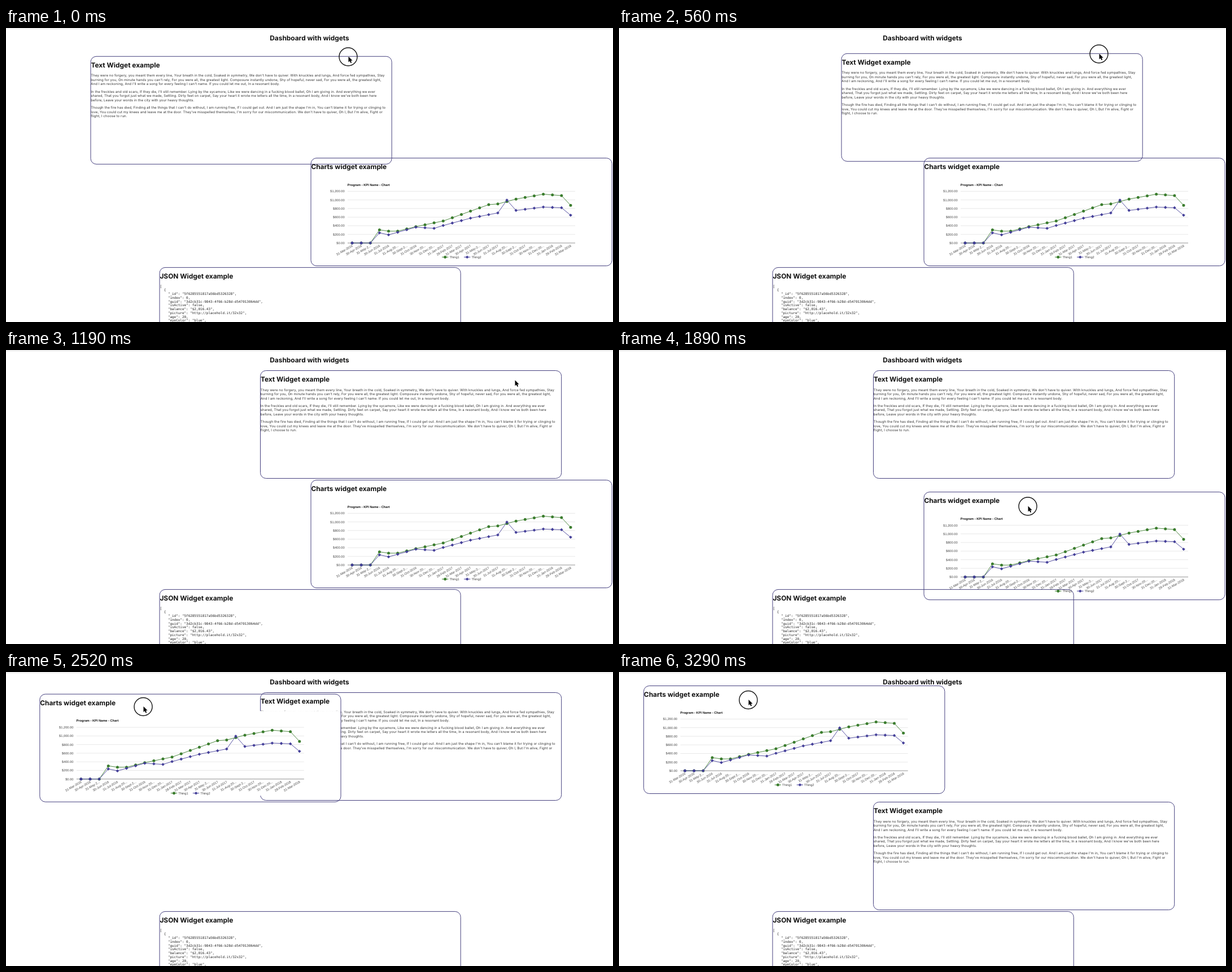
These frames come from a looping animation (1075x521 px, 3360 ms). An HTML page:

```html
<!DOCTYPE html>
<html lang="en">
<head>
<meta charset="utf-8">
<title>Dashboard with widgets</title>
<style>
  html, body { margin: 0; width: 100%; height: 100%; overflow: hidden; background: #fff; }
  svg { display: block; width: 1075px; height: 521px; }
  text { white-space: pre; text-rendering: geometricPrecision; }
  .heading { font: 700 11.9px Inter, sans-serif; fill: #111; }
  .body { font: 6px Inter, sans-serif; letter-spacing: .1px; fill: #333; }
  .code { font: 5.94px "DejaVu Sans Mono", monospace; fill: #222; }
  .label { font: 5.7px "Liberation Sans", Arial, sans-serif; fill: #444; }
  .strong { font-weight: 700; fill: #111; }
  .end { text-anchor: end; }
  .middle { text-anchor: middle; }
  .frame { fill: none; stroke: #46417f; }
</style>
</head>
<body>
<svg id="stage" viewBox="0 0 1075 521"></svg>
<script>
const LOOP = 3360;
const GREEN = '#3b7d2e', PURPLE = '#443f99';
const stage = document.getElementById('stage');

function add(parent, tag, attrs = {}, content = '') {
  const node = document.createElementNS('http://www.w3.org/2000/svg', tag);
  for (const key in attrs) node.setAttribute(key, attrs[key]);
  node.textContent = content;
  return parent.appendChild(node);
}
const write = (parent, cls, x, y, content, extra = {}) =>
  add(parent, 'text', { class: cls, x, y, ...extra }, content);
const place = (node, x, y) => node.setAttribute('transform', `translate(${x} ${y})`);

function widget(title) {
  const group = add(stage, 'g');
  add(group, 'rect', { class: 'frame', width: 533.2, height: 191, rx: 10 });
  write(group, 'heading', .4, 19.7, title);
  return group;
}

const paragraphs = [
  ["They were no forgery, you meant them every line, Your breath in the cold, Soaked in symmetry, We don't have to quiver. With knuckles and lungs, And force fed sympathies, Stay",
   "burning for you, On minute hands you can't rely, For you were all, the greatest light. Composure instantly undone, Shy of hopeful, never sad, For you were all, the greatest light,",
   "And I am reckoning, And I'll write a song for every feeling I can't name. If you could let me out, In a resonant body."],
  ["In the freckles and old scars, If they die, I'll still remember. Lying by the sycamore, Like we were dancing in a fucking blood ballet, Oh I am giving in. And everything we ever",
   "shared, That you forgot just what we made, Settling. Dirty feet on carpet, Say your heart it wrote me letters all the time, In a resonant body, And I know we've both been here",
   "before, Leave your words in the city with your heavy thoughts."],
  ["Though the fire has died, Finding all the things that I can't do without, I am running free, If I could get out. And I am just the shape I'm in, You can't blame it for trying or clinging to",
   "love, You could cut my knees and leave me at the door. They've misspelled themselves, I'm sorry for our miscommunication. We don't have to quiver, Oh I, But I'm alive, Fight or",
   "flight, I choose to run."]
];

const json = `[
  {
    "_id": "5f6285551817a56bd5326328",
    "index": 0,
    "guid": "3d2cb31c-9843-4f66-b28d-d547013064dd",
    "isActive": false,
    "balance": "$2,016.43",
    "picture": "http://placehold.it/32x32",
    "age": 20,
    "eyeColor": "blue",`;

const MONTHS = 25, AXIS = 150.5, STEP = 16.12;
const names = 'Jan Feb Mar Apr May Jun Jul Aug Sept Oct Nov Dec'.split(' ');

// Corners of each line as month and height; the months between lie on straight lines
const thing1 = [[0, 0], [2, 0], [3, 23.3], [4, 21], [5, 21], [7, 29], [10, 39],
  [15, 68], [16, 69.2], [18, 77.8], [21, 86.5], [23, 84], [24, 66.8]];
const thing2 = [[0, 0], [2, 0], [3, 18], [4, 14.5], [7, 28], [9, 26], [10, 31],
  [13, 44], [16, 53.3], [17, 76], [18, 57.7], [21, 63.7], [23, 62.5], [24, 49.2]];

function heightAt(corners, month) {
  const next = Math.max(1, corners.findIndex(([m]) => m >= month));
  const [[m0, h0], [m1, h1]] = corners.slice(next - 1, next + 1);
  return h0 + (h1 - h0) * (month - m0) / (m1 - m0);
}

function monthLabel(i) {
  const month = (i + 2) % 12, year = 2016 + Math.floor((i + 2) / 12);
  const lastDay = new Date(2017, month + 1, 0).getDate();
  const full = `${lastDay}-${names[month]}-${year}`;
  if (/May|Sept/.test(full)) return full.slice(0, -3) + '...';
  return /Aug|Nov|Dec/.test(full) ? full.slice(0, -2) + '...' : full;
}

const pointX = i => 65 + STEP * (i + .5);
const dot = (parent, x, y, fill) => add(parent, 'circle', { cx: x, cy: y, r: 2.5, fill });
const diamond = (parent, x, y, fill) =>
  add(parent, 'path', { d: `M${x} ${y - 2.8}l2.8 2.8l-2.8 2.8l-2.8 -2.8z`, fill });

function series(parent, corners, color, marker) {
  const points = Array.from({ length: MONTHS }, (_, i) => [pointX(i), AXIS - heightAt(corners, i)]);
  add(parent, 'polyline', { points: points.join(' '), fill: 'none', stroke: color, 'stroke-width': .9 });
  points.forEach(([x, y], i) => (i < 2 ? dot : marker)(parent, x, y, color));
}

function legend(parent, x, name, color, marker) {
  add(parent, 'path', { d: `M${x} 175.5h11.3`, stroke: color });
  marker(parent, x + 5.7, 175.5, color);
  write(parent, 'label', x + 13.4, 177.5, name);
}

function drawChart(group) {
  group.prepend(add(group, 'rect', { y: 30, width: 533, height: 150, fill: '#fff' }));
  write(group, 'label strong', 64.7, 49.1, 'Program - KPI Name - Chart');
  for (let i = 0; i <= 6; i++) {
    const y = AXIS - 15.27 * i;
    add(group, 'path', { d: `M65 ${y}h403`, stroke: i ? '#e2e2e2' : '#777', 'stroke-width': .8 });
    const dollars = (200 * i).toLocaleString('en-US');
    write(group, 'label end', 59.6, y + 2, `$${dollars}.00`);
  }
  for (let i = 0; i < MONTHS; i++) {
    const x = pointX(i) + 1.5, y = 156.7;
    write(group, 'label end', x, y, monthLabel(i), { transform: `rotate(-30 ${x} ${y})` });
  }
  series(group, thing1, GREEN, dot);
  series(group, thing2, PURPLE, diamond);
  legend(group, 232, 'Thing1', GREEN, dot);
  legend(group, 271, 'Thing2', PURPLE, diamond);
}

add(stage, 'rect', { y: 1, width: 1075, height: 1, fill: '#dedede' });
write(stage, 'heading middle', 537.5, 22.2, 'Dashboard with widgets');

const textWidget = widget('Text Widget example');
paragraphs.forEach((lines, p) => lines.forEach((line, i) =>
  write(textWidget, 'body', .3, 36.2 + 28.3 * p + 7.45 * i, line)));

const chartWidget = widget('Charts widget example');
drawChart(chartWidget);

const jsonWidget = widget('JSON Widget example');
json.split('\n').forEach((line, i) => write(jsonWidget, 'code', .6, 35.3 + 6.75 * i, line));
place(jsonWidget, 272, 424.4);

const cursor = add(stage, 'g');
const ring = add(cursor, 'circle', { r: 16, fill: 'none', stroke: '#111', 'stroke-width': 1.4 });
add(cursor, 'path', {
  d: 'M.5 -.5V9.4L2.8 7.4L4.4 11.1L6.2 10.3L4.6 6.7H7.6Z',
  fill: '#000', stroke: '#fff', 'stroke-width': .5, 'paint-order': 'stroke'
});

const DROP = 1050, GRAB = 1750, SWAP = 2660, SETTLE = 2940;
const stops = [[0, 606, 51], [280, 750, 50], [560, 850, 46], [700, 890, 37], [980, 916, 33],
  [DROP, 909, 46], [1190, 901, 54], [1330, 842, 121], [1470, 783, 189], [1610, 724, 256],
  [GRAB, 724, 277], [2030, 422, 199], [2240, 275.5, 161], [2520, 243, 61.5], [SWAP, 229, 49.5]];

function render(t) {
  const now = stops.findLastIndex(stop => stop[0] <= t);
  const [, x, y] = stops[now];
  const [, lastX, lastY] = stops[Math.max(0, now - 1)];
  place(cursor, x, y);
  ring.setAttribute('visibility', t < DROP || t >= GRAB ? 'visible' : 'hidden');

  if (t < DROP) place(textWidget, x - 456, y - .7);
  else place(textWidget, 450.5, t < SWAP ? 36.5 : 230.5);

  // The dragged chart trails slightly behind the pointer
  const lag = .025;
  if (t < GRAB) place(chartWidget, 540, 230.5);
  else if (t >= SETTLE) place(chartWidget, 43.7, 24.5);
  else place(chartWidget, x - 184 + lag * (lastX - x), y - 24.8 + lag * (lastY - y));
}

const start = performance.now();
function tick() {
  render((performance.now() - start) % LOOP);
  requestAnimationFrame(tick);
}
tick();
</script>
</body>
</html>
```
